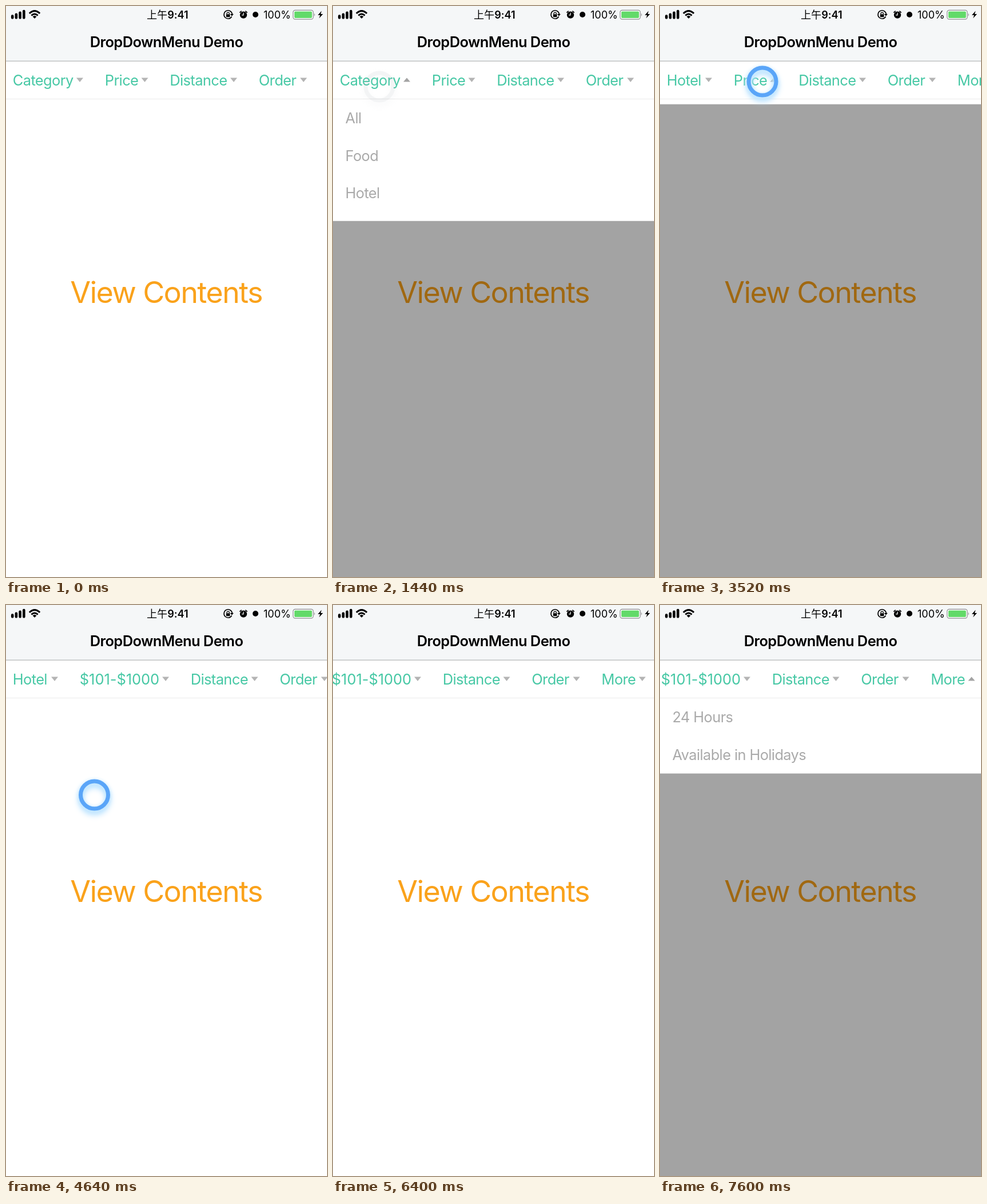
Recreate the animation shown at these times as an HTML page. Size 561 by 998 pixels, loop 8000 ms.

```html
<!DOCTYPE html>
<html lang="en">
<head>
<meta charset="utf-8">
<title>Drop-down menu</title>
<style>
html, body { margin: 0; height: 100%; overflow: hidden; background: #fff; }
svg { display: block; width: 100vw; height: 100vh; }
text {
  font: 400 25.4px Inter, "Noto Sans CJK SC", "Noto Sans CJK", sans-serif;
  font-variation-settings: "opsz" 14;
  font-feature-settings: "calt" 0;
  letter-spacing: -.6px;
}
.mid { text-anchor: middle; }
.title { font-weight: 600; letter-spacing: -.55px; }
.status text { font-size: 18px; letter-spacing: 0; }
.status .clock { font-weight: 500; }
.status .digits { font-weight: 600; }
.big { font-size: 52px; letter-spacing: -1.6px; fill: #faa21b; }
#tabs text { fill: #47c8a5; }
#tabs .number { letter-spacing: 0; }
#list text { fill: #aaa; }
</style>
</head>
<body>
<svg viewBox="0 0 561 998" preserveAspectRatio="none">
  <defs>
    <clipPath id="clip"><rect id="clipBox" y="162.9" width="561" height="0"/></clipPath>
  </defs>
  <rect width="561" height="998" fill="#fff"/>
  <text class="big mid" x="280" y="519.3">View Contents</text>
  <rect id="dim" y="162" width="561" height="836" opacity=".36"/>
  <g id="list" clip-path="url(#clip)">
    <rect y="162" width="561" height="400" fill="#fff"/>
    <g id="rows"></g>
  </g>

  <rect y="96" width="561" height="67" fill="#fff"/>
  <rect y="162" width="561" height="1" fill="#ebebeb"/>
  <g id="tabs"></g>

  <rect width="561" height="96" fill="#f5f7f8"/>
  <rect y="95.7" width="561" height="1.2" fill="#b4b6b7"/>
  <text class="title mid" x="280.5" y="72">DropDownMenu Demo</text>

  <g class="status">
    <path d="M11.2 17.5v3M17.9 14.8v5.7M24.6 11.8v8.7M31.3 9v11.5" stroke="#000" stroke-width="4.6" stroke-linecap="round"/>
    <g fill="none" stroke="#000" stroke-width="3">
      <path d="M40.8 13Q50 4.2 59.2 13M44.4 16.6Q50 11.4 55.6 16.6"/>
      <path d="M46.6 18.4Q50 15.4 53.4 18.4L50 22Z" fill="#000" stroke="none"/>
    </g>
    <text class="clock" x="246" y="21.7">上午</text>
    <text class="clock digits" x="282.3" y="21.7">9:41</text>

    <path d="M394.5 18.5A7.2 7.2 0 1 1 395.3 14" fill="none" stroke="#000" stroke-width="1.6"/>
    <path d="M391.8 14h6l-3 3.8z"/>
    <path d="M384.8 14.4h6.6v5h-6.6z"/>
    <path d="M386 14.6v-1.4a2.1 2.1 0 0 1 4.2 0v1.4" fill="none" stroke="#000" stroke-width="1.3"/>

    <circle cx="415" cy="15.6" r="6.2"/>
    <path d="M408.8 11.2l2.4-2M421.2 11.2l-2.4-2" stroke="#000" stroke-width="1.6" stroke-linecap="round"/>
    <path d="M415 11.8v4h-3" fill="none" stroke="#f5f7f8" stroke-width="1.3"/>

    <circle cx="436" cy="15" r="5"/>
    <text x="450" y="21.7">100%</text>
    <rect x="501.8" y="7.3" width="35.2" height="15.8" rx="3.6" fill="#fff" stroke="#8b8d8e" stroke-width="1.2"/>
    <rect x="504" y="9.5" width="30.8" height="11.4" rx="1.6" fill="#62da69"/>
    <path d="M538.6 12.4q2.4 2.8 0 5.6z" fill="#8b8d8e"/>
    <path d="M551.6 8.6l-6.6 7.4h4l-1.8 5.6 6.8-7.6h-4z"/>
  </g>

  <g id="touch"><circle r="24" fill="none" stroke="#5aa5f8" stroke-width="7"/></g>
</svg>
<script>
const LOOP = 8000, ROW = 65.83, OPEN_MS = 400;
const $ = id => document.getElementById(id);

// slot: distance from this tab's start to the next one
const tabs = [
  { label: 'Category', slot: 161, picked: 'Hotel', pickedSlot: 117, at: 2570 },
  { label: 'Price', slot: 113.5, picked: '$101-$1000', pickedSlot: 194, at: 4620 },
  { label: 'Distance', slot: 155.5 },
  { label: 'Order', slot: 122 },
  { label: 'More', slot: 115 }
];
const menus = [
  { tab: 0, from: 1232, to: 2570, items: ['All', 'Food', 'Hotel', 'Bank', 'Cinema', 'Entertainment'] },
  { tab: 1, from: 3468, to: 4620, items: ['All', '$0-$100', '$101-$1000', '$1001-$3000'] },
  { tab: 4, from: 6960, to: LOOP, items: ['24 Hours', 'Available in Holidays'] }
];
const taps = [
  { at: 1232, x: 81, y: 141 },
  { at: 2570, x: 120, y: 330 },
  { at: 3468, x: 179, y: 132 },
  { at: 4620, x: 154.5, y: 332 },
  { at: 6960, x: 500, y: 132 }
];
const swipe = { down: 5440, move: 5480, up: 5800, peak: 6080 };

const clamp = v => Math.max(0, Math.min(1, v));
const easeInOut = u => u < .5 ? 2 * u * u : 1 - 2 * (1 - u) ** 2;

function add(parent, name, attrs = {}) {
  const el = document.createElementNS('http://www.w3.org/2000/svg', name);
  for (const k in attrs) el.setAttribute(k, attrs[k]);
  return parent.appendChild(el);
}

for (const tab of tabs) {
  tab.text = add($('tabs'), 'text', { y: 138.5 });
  tab.arrow = add($('tabs'), 'path');
}
for (const menu of menus) {
  menu.group = add($('rows'), 'g');
  menu.items.forEach((item, i) => {
    add(menu.group, 'text', { x: 21.5, y: 204.7 + i * ROW }).textContent = item;
  });
}

// Swipe with momentum past the end, then a spring back
function scrollAt(t) {
  if (t < swipe.move) return 0;
  if (t < swipe.peak) {
    const u = (t - swipe.move) / (swipe.peak - swipe.move);
    return 150 * Math.sin(u * Math.PI / 2);
  }
  return 127 + 23 * Math.exp((swipe.peak - t) / 183);
}

function drawTabs(t, open) {
  let x = 13 - scrollAt(t);
  tabs.forEach((tab, i) => {
    const done = t >= tab.at;
    const label = done ? tab.picked : tab.label;
    const slot = done ? tab.pickedSlot : tab.slot;
    const mid = x + slot - 45;
    const up = open && open.tab === i;
    tab.text.textContent = label;
    tab.text.classList.toggle('number', /\d/.test(label));
    tab.text.setAttribute('x', x - 1.2);
    tab.arrow.setAttribute('d', up
      ? `M${mid - 6} 132.5h12l-6 -7z`
      : `M${mid - 6} 125.5h12l-6 7.5z`);
    tab.arrow.setAttribute('fill', up ? '#a4a4a4' : '#b4b4b4');
    x += slot;
  });
}

function drawMenu(t, open) {
  $('dim').style.display = $('list').style.display = open ? '' : 'none';
  for (const menu of menus) menu.group.style.display = menu === open ? '' : 'none';
  if (!open) return;
  const grown = easeInOut(clamp((t - open.from) / OPEN_MS));
  $('clipBox').setAttribute('height', grown * open.items.length * ROW);
}

function drawTouch(t) {
  let x = 0, y = 0, alpha = 0;
  const tap = taps.find(p => t >= p.at - 50 && t < p.at + 225);
  if (tap) {
    ({ x, y } = tap);
    alpha = 1 - clamp((t - tap.at - 60) / 165);
  } else if (t >= swipe.down && t < swipe.peak) {
    x = 400 - scrollAt(Math.min(t, swipe.up));
    y = 132;
    alpha = 1 - clamp((t - swipe.up) / 165);
  }
  const touch = $('touch');
  touch.setAttribute('transform', `translate(${x} ${y})`);
  touch.style.opacity = alpha;
  touch.style.filter = `drop-shadow(0 1px 3px #c4e8ff) drop-shadow(0 6px 4px #b4e0ff) saturate(${alpha})`;
}

let start;
function frame(now) {
  start ??= now;
  const t = (now - start) % LOOP;
  const open = menus.find(m => t >= m.from && t < m.to);
  drawTabs(t, open);
  drawMenu(t, open);
  drawTouch(t);
  requestAnimationFrame(frame);
}
requestAnimationFrame(frame);
</script>
</body>
</html>
```
